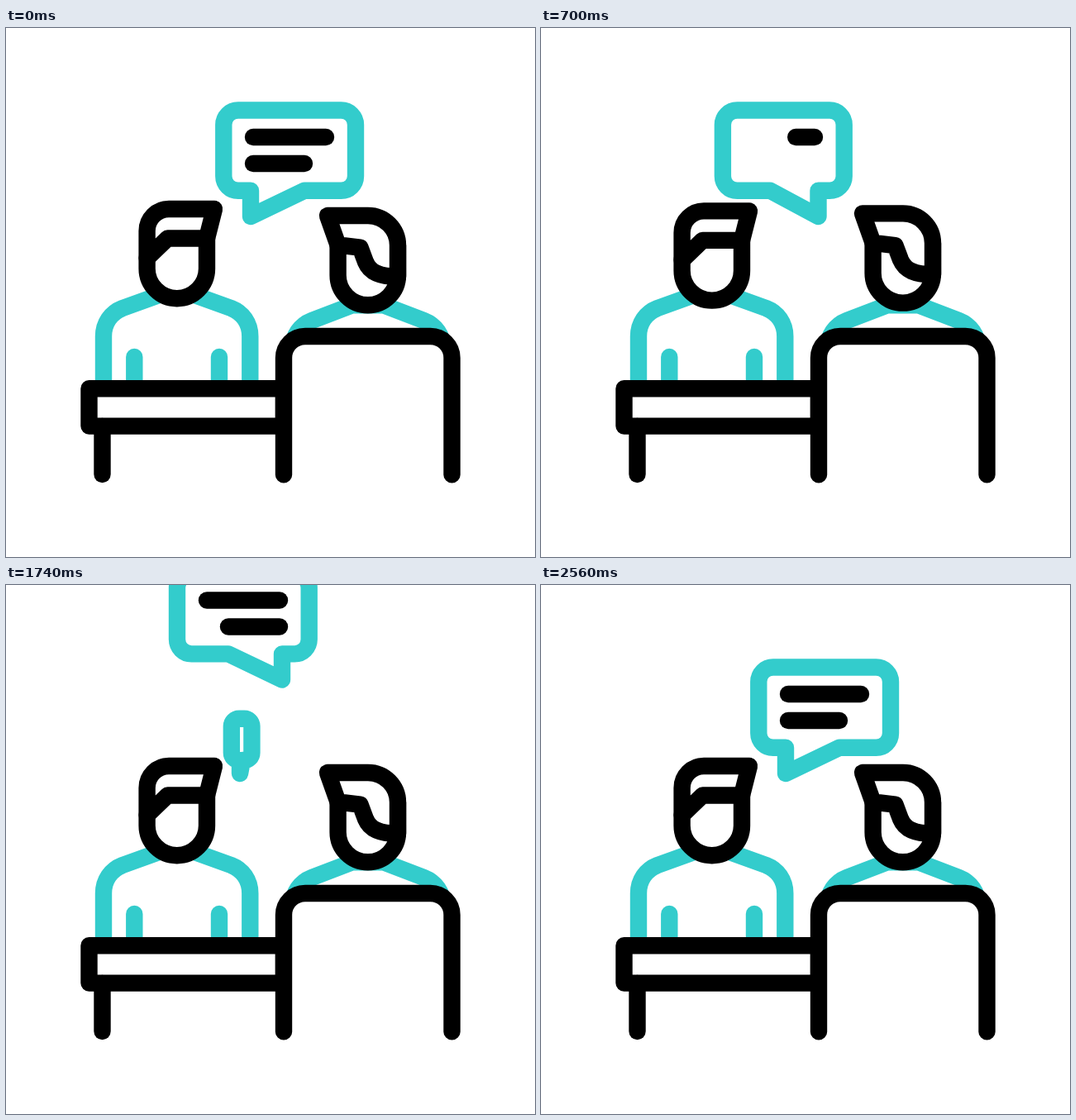
An HTML page with a canvas that plays this animation: 640x640 px, repeating every 3000 ms.

```html
<!DOCTYPE html>
<html lang="en">
<head>
<meta charset="utf-8">
<title>Conversation at a desk</title>
<style>
  html, body { margin: 0; width: 100%; height: 100%; overflow: hidden; background: #fff; }
  canvas { display: block; width: 100vmin; height: 100vmin; }
</style>
</head>
<body>
<canvas id="stage" width="640" height="640"></canvas>
<script>
const ctx = document.getElementById('stage').getContext('2d');
const LOOP = 3000, STEP = 20, REPLY = 1460;
const TEAL = '#33cccc', BLACK = '#000', WHITE = '#fff';

const path = d => new Path2D(d);
const shapes = {
  leftBody: path('M118 432V373C118 357 127 344.5 141 339L184 323.5' +
    'M295.3 432V373C295.3 357 286.3 344.5 272.3 339L229.3 323.5'),
  leftArms: path('M155.3 398V432M258 398V432'),
  rightBody: path('M347 388C347 372 356 359.5 370 354L419 335.3H456.6' +
    'L505.6 354C519.6 359.5 528.6 372 528.6 388'),
  table: path('M336 436.2H100.5V481.6H336Z'),
  tableLeg: path('M116.5 482V540'),
  desk: path('M336 540.4V399A26 26 0 0 1 362 373H513.5A26 26 0 0 1 539.5 399V540.4'),
  leftFace: path('M170.6 278V291A36.2 36.2 0 0 0 243 291V254.5'),
  leftHair: path('M252 219H197A26.4 26.4 0 0 0 170.6 245.4V278.5L195.5 254.5H243Z'),
  rightFace: path('M401.6 263V299A36.2 36.2 0 0 0 474 299V263'),
  rightHair: path('M389 227H438A36 36 0 0 1 474 263V301C452 300.5 440.5 296 435 283' +
    'L428.5 265.7L401.6 262.5Z')
};

const mix = (a, b, k) => a + (b - a) * k;
const ease = (t, start, end) => {
  const u = Math.min(1, Math.max(0, (t - start) / (end - start)));
  return u * u * (3 - 2 * u);
};

function stroke(shape, color, fill) {
  if (fill) {
    ctx.fillStyle = fill;
    ctx.fill(shape);
  }
  ctx.strokeStyle = color;
  ctx.stroke(shape);
}

function textLine(x, y, length, k) {
  if (k > 0) stroke(path(`M${x} ${y}h${length * k}`), BLACK);
}

// The outline grows from its tail tip as a narrow bubble, then widens.
function bubbleOutline(scale, widen) {
  const tip = mix(283, 296, widen), tipY = 228;
  const px = x => tip + (x - tip) * scale;
  const py = y => tipY + (y - tipY) * scale;
  const left = px(263.3), right = px(mix(311, 423, widen));
  const top = py(99.5), bottom = py(196.8), r = 17.5 * scale;
  const tailRight = px(mix(289, 361, widen));
  const p = new Path2D();
  p.moveTo(tip, tipY);
  p.lineTo(tip, bottom);
  p.lineTo(left + r, bottom);
  p.arcTo(left, bottom, left, bottom - r, r);
  p.lineTo(left, top + r);
  p.arcTo(left, top, left + r, top, r);
  p.lineTo(right - r, top);
  p.arcTo(right, top, right, top + r, r);
  p.lineTo(right, bottom - r);
  p.arcTo(right, bottom, right - r, bottom, r);
  p.lineTo(tailRight, bottom);
  p.closePath();
  return p;
}

function bubble(age, leaveAge, mirrored) {
  const scale = ease(age, 76, 476);
  const rise = 260 * ease(leaveAge, 65, 535);
  if (scale === 0 || rise > 245) return;
  ctx.save();
  ctx.translate(0, -rise);
  if (mirrored) {
    ctx.translate(630, 0);
    ctx.scale(-1, 1);
  }
  stroke(bubbleOutline(scale, ease(age, 476, 760)), TEAL);
  textLine(299, 132, 88, ease(age, 610, 880));
  textLine(299, 164, 62, ease(age, 830, 1100));
  ctx.restore();
}

function head(face, hair, dy) {
  ctx.save();
  ctx.translate(0, dy);
  stroke(face, BLACK, WHITE);
  stroke(hair, BLACK, WHITE);
  ctx.restore();
}

function draw(t) {
  ctx.fillStyle = WHITE;
  ctx.fillRect(0, 0, 640, 640);
  ctx.lineWidth = 20.4;
  ctx.lineJoin = ctx.lineCap = 'round';

  const nod = ease(t, 0, 420) - ease(t, 420, 850) + ease(t, 850, 1230) - ease(t, 1230, 1660);

  ctx.lineCap = 'butt';
  stroke(shapes.leftBody, TEAL);
  stroke(shapes.rightBody, TEAL);
  ctx.lineCap = 'round';
  stroke(shapes.leftArms, TEAL);
  stroke(shapes.table, BLACK, WHITE);
  stroke(shapes.tableLeg, BLACK);
  stroke(shapes.desk, BLACK, WHITE);

  if (t < REPLY) bubble(LOOP, t, false);
  else bubble(t - REPLY, 0, false);
  bubble(t, t - REPLY, true);

  head(shapes.leftFace, shapes.leftHair, 8.6 * nod);
  head(shapes.rightFace, shapes.rightHair, -9.3 * nod);
}

const begin = performance.now();
function tick() {
  const t = (performance.now() - begin) % LOOP;
  draw(Math.floor(t / STEP) * STEP);
  requestAnimationFrame(tick);
}
tick();
</script>
</body>
</html>
```
